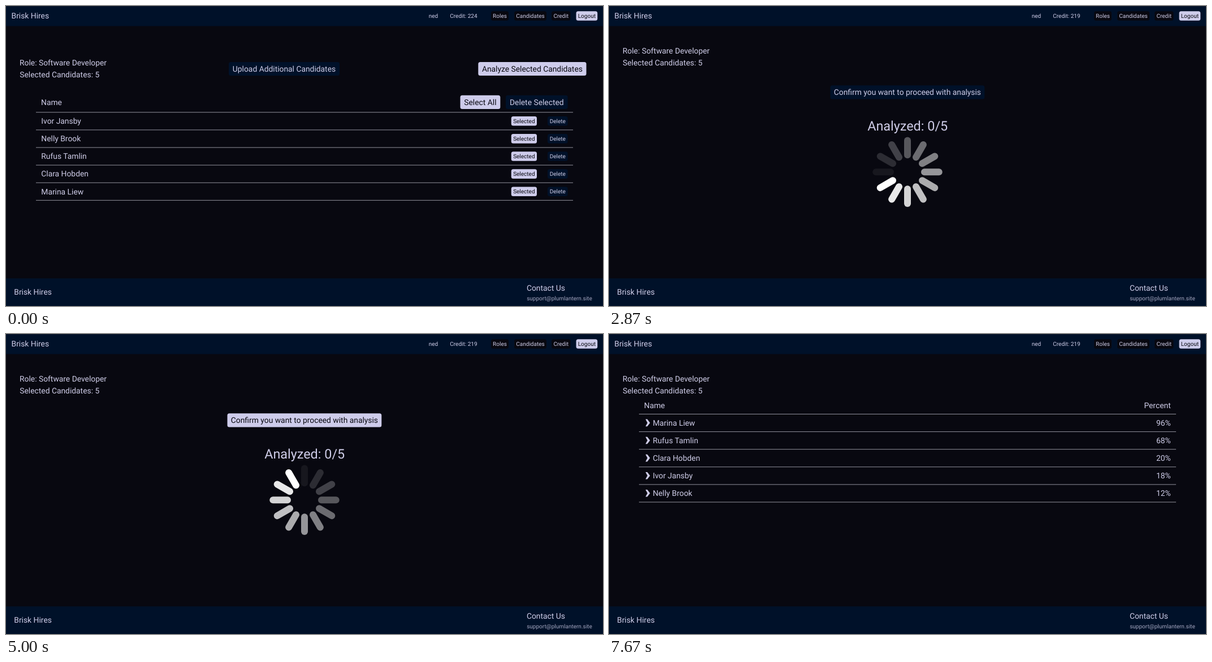
Animation of 1056 by 530 pixels, one loop 8 s. Source, as an HTML page:

```html
<!DOCTYPE html>
<html lang="en">
<head>
<meta charset="utf-8">
<title>Candidate analysis</title>
<style>
  html, body { margin: 0; width: 100%; height: 100%; overflow: hidden; background: #080810; }
  svg { display: block; width: 100%; height: 100%; }
  text { font-family: Roboto, sans-serif; white-space: pre; text-rendering: geometricPrecision; }
</style>
</head>
<body>
<svg id="stage" viewBox="0 0 1056 530"></svg>
<script>
const LOOP = 8000;
const PAGE = '#080810', NAVY = '#001129', PALE = '#cecceb', INK = '#cfcde8', RULE = '#91919c';
const BASE = 13.85, SMALL = 10, LARGE = 23.4;
const BRAND = 'Brisk Hires';

// Times in ms at which the interface changes.
const HOVER_ANALYZE = 600, OPEN_CONFIRM = 800, HOVER_CONFIRM = 1800, START = 2800,
      LEAVE_CONFIRM = 3870, RESULTS = 6870;
const COUNTS = [5300, 5700, 6100, 6450, 6750];
const SPIN_ORIGIN = 3136, SPIN_STEP = 80;

const candidates = ['Ivor Jansby', 'Nelly Brook', 'Rufus Tamlin', 'Clara Hobden', 'Marina Liew'];
const ranking = [[4, 96], [2, 68], [3, 20], [0, 18], [1, 12]];

// Text is placed by the vertical middle of its capitals.
const text = (x, middle, content, size = BASE, fill = INK, anchor = 'start') =>
  `<text x="${x}" y="${middle + size * 0.355}" font-size="${size}" fill="${fill}" text-anchor="${anchor}">${content}</text>`;

const rect = (x, y, w, h, fill, r = 0) =>
  `<rect x="${x}" y="${y}" width="${w}" height="${h}" rx="${r}" fill="${fill}"/>`;

const rule = y => rect(53, y - 0.5, 950, 1, RULE);

function button(x, middle, w, label, fill, size = BASE) {
  const h = size === BASE ? 24.2 : 16.6;
  return rect(x, middle - h / 2 + 0.1, w, h, fill, 3.5) +
    text(x + w / 2, middle, label, size, fill === PALE ? PAGE : INK, 'middle');
}

function frame(credit) {
  return rect(0, 0, 1056, 530, PAGE) +
    rect(0, 0, 1056, 35.5, NAVY) + rect(0, 0, 1056, 0.8, '#141d2b') +
    rect(0, 481.2, 1056, 48.8, NAVY) +
    text(9.5, 17.2, BRAND) +
    text(747.7, 17.3, 'ned', SMALL) +
    text(785.3, 17.3, 'Credit: ' + credit, SMALL) +
    button(858, 17.4, 31, 'Roles', PAGE, SMALL) +
    button(899, 17.4, 57, 'Candidates', PAGE, SMALL) +
    button(965, 17.4, 33.5, 'Credit', PAGE, SMALL) +
    button(1008.5, 17.4, 37.7, 'Logout', PALE, SMALL) +
    text(14.3, 505.5, BRAND) +
    text(920.9, 497.7, 'Contact Us') +
    text(921.2, 516.4, 'support@plumlantern.site', SMALL, '#a3a5bf');
}

const role = y => text(24, y, 'Role: Software Developer') + text(24.3, y + 20.7, 'Selected Candidates: 5');

function listPage(t) {
  const rows = candidates.map((name, i) => {
    const y = 203.2 + i * 31.1;
    return text(62.3, y, name) + rule(y + 15.7) +
      button(893.7, y, 45.3, 'Selected', PALE, SMALL) +
      button(958, y, 35.6, 'Delete', NAVY, SMALL);
  });
  return role(100.2) +
    button(394, 110.9, 196, 'Upload Additional Candidates', NAVY) +
    button(835.3, 110.9, 191.2, 'Analyze Selected Candidates', t < HOVER_ANALYZE ? PALE : NAVY) +
    text(62, 169.8, 'Name') +
    button(803.5, 169.8, 70.8, 'Select All', PALE) +
    button(884, 169.8, 109.6, 'Delete Selected', NAVY) +
    rule(187.8) + rows.join('');
}

function spinner(t) {
  const head = Math.floor((t - SPIN_ORIGIN) / SPIN_STEP);
  let spokes = '';
  for (let i = 0; i < 12; i++) {
    const age = (((head - i) % 12) + 12) % 12;
    spokes += `<path d="M0-30V-55.7" transform="rotate(${i * 30})" opacity="${1 - age / 11.7}"/>`;
  }
  return `<g transform="translate(528 293.3)" stroke="#fff" stroke-width="12" stroke-linecap="round">${spokes}</g>`;
}

function confirmPage(t) {
  const hovered = t >= HOVER_CONFIRM && t < LEAVE_CONFIRM;
  const done = COUNTS.filter(at => t >= at).length;
  return role(79.3) +
    button(391.5, 152.2, 272.8, 'Confirm you want to proceed with analysis', hovered ? NAVY : PALE) +
    text(528.2, 212, `Analyzed: ${done}/5`, LARGE, INK, 'middle') +
    (t < START ? '' : spinner(t));
}

function resultsPage() {
  const rows = ranking.map(([who, percent], i) => {
    const y = 156.6 + i * 31.1;
    return `<path d="M64.6 ${y - 6}h3.2l4.8 6.3-4.8 6.3h-3.2l3.4-6.3z" fill="${INK}"/>` +
      text(77.4, y, candidates[who]) +
      text(993.7, y, percent + '%', BASE, INK, 'end') + rule(y + 16);
  });
  return role(79.3) + text(62, 125.7, 'Name') +
    text(993.7, 125.7, 'Percent', BASE, INK, 'end') + rule(141.5) + rows.join('');
}

const stage = document.getElementById('stage');
let shown = '';

function draw() {
  const t = performance.now() % LOOP;
  const page = t < OPEN_CONFIRM ? listPage : t < RESULTS ? confirmPage : resultsPage;
  const scene = frame(t < START ? 224 : 219) + page(t);
  if (scene !== shown) stage.innerHTML = shown = scene;
  requestAnimationFrame(draw);
}
draw();
</script>
</body>
</html>
```
